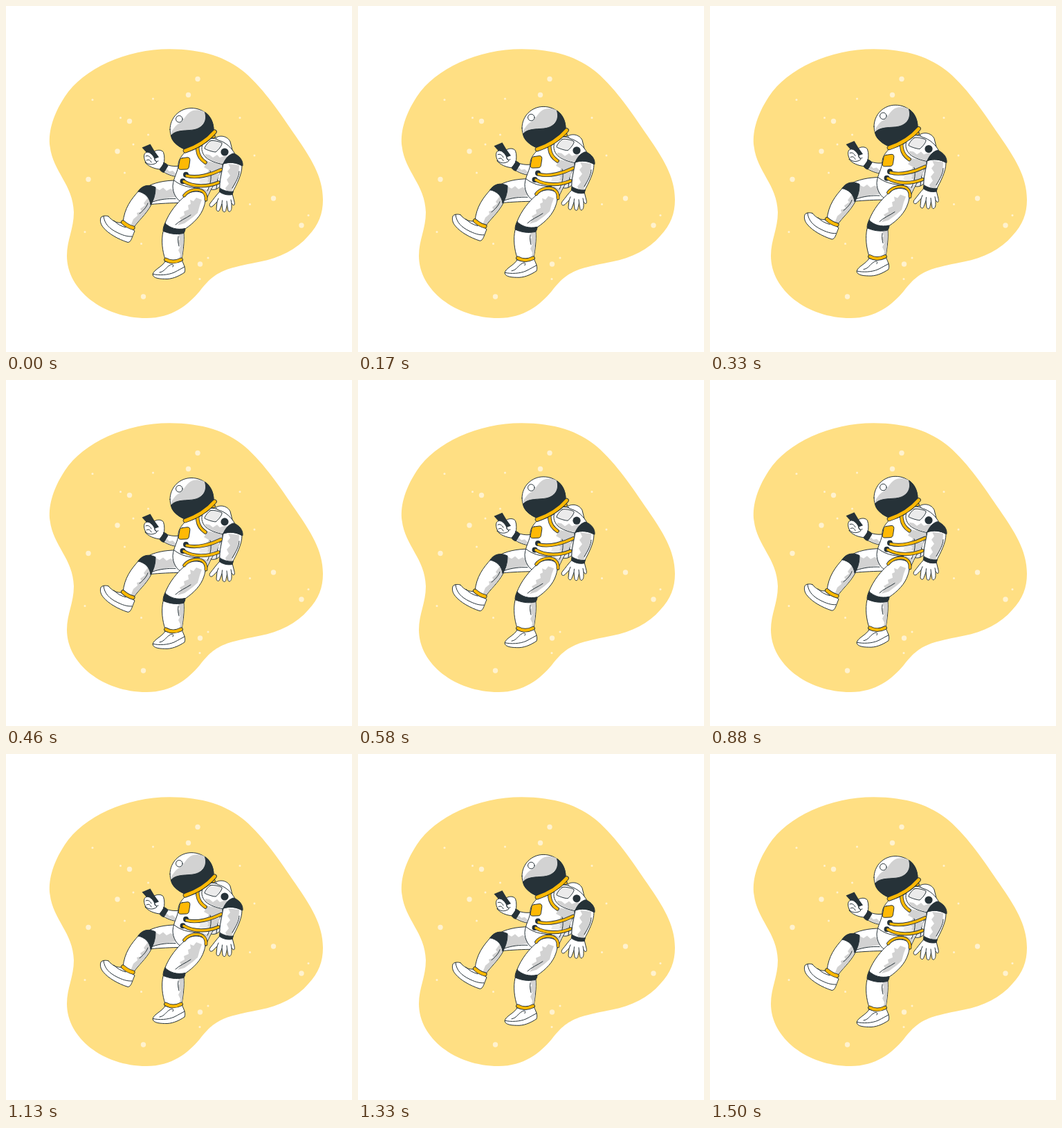
An HTML page for the animation above (1.54 s loop, 500x500 px).

```html
<!DOCTYPE html>
<html lang="en">
<head>
<meta charset="utf-8">
<title>Floating astronaut</title>
<style>
  html, body { margin: 0; width: 100%; height: 100%; overflow: hidden; background: #fff; }
  svg { display: block; width: 100vw; height: 100vh; }
  .line { fill: none; stroke: #263238; stroke-width: 1; stroke-linecap: round; stroke-linejoin: round; }
  .suit { fill: #fff; }
  .pale { fill: #ebebeb; }
  .shade { fill: #d2d2d2; }
  .dark { fill: #263238; }
  .gold { fill: #ffb905; }
  .blob { fill: #ffdf83; }
  .star { fill: #fff2cf; }
</style>
</head>
<body>
<svg id="stage" viewBox="0 0 500 500"></svg>
<script>
const INK = '#263238', GOLD = '#ffb905';

const fill = (name, d) => `<path class="${name}" d="${d}"/>`;
const line = d => fill('line', d);
const part = (name, d) => fill('line ' + name, d);
const dot = (name, x, y, r) => `<circle class="${name}" cx="${x}" cy="${y}" r="${r}"/>`;
const stroke = (d, w, color) =>
  `<path d="${d}" fill="none" stroke="${color}" stroke-width="${w}" stroke-linecap="round"/>`;
const band = (d, w) => stroke(d, w + 1.8, INK) + stroke(d, w, GOLD);

const bigStars = [[277, 105.5], [263.5, 128.5], [178.5, 166.5], [161, 210], [119, 250.5],
  [386.5, 278], [427, 317], [280.5, 373], [198.5, 420]];
const smallStars = [[125, 135.5], [212.5, 134], [165.5, 161.5], [338, 161.5], [205.5, 186],
  [184, 200], [171.5, 241], [114, 326.5], [359, 216], [352.5, 286.5], [437, 302.5],
  [195.5, 343.5], [292, 364], [280, 394.5]];

const sky = [
  fill('blob', `M237 62.3C175 62 112 90 85 131C66 160 61 185 63.5 203C68 240 97 258 98 298
    C98 322 88 338 88 361C88 410 140 451 203 451C240 451 263 432 280 412
    C294 394 303 387 320 380.5C338 375 350 373 367 369.5C395 364 420 352 437 332
    C452 316 458 300 458 280C458 246 440 219 418 187C398 158 374 121 345 96
    C319 74 283 62.3 237 62.3Z`),
  ...bigStars.map(([x, y]) => dot('star', x, y, 3.7)),
  ...smallStars.map(([x, y]) => dot('star', x, y, 1.5))
];

const backpack = [
  part('suit', 'M300 193C305 186 319 186 324 196L328 212L303 204Z'),
  part('pale', 'M296 228L314 224L309 261C304 266 298 267 291 263Z'),
  line('M307 240L304 264')
];

const phoneArm = [
  part('suit', 'M230 228.5C237 231.5 245 232.5 253 230.5L249 247C240 246 232 243 225 238Z'),
  fill('shade', 'M229 237.5L233 236L236 239L241 238L245 242L249 241L248 246C240 245 233 242 229 239Z'),
  part('suit', `M213 211C217 207.5 225 207 227.5 211.5C229.5 217 229 224 228 228L222 236
    C214 235 206 232 201 226L206 214Z`),
  fill('dark', 'M196.5 204.5L208.5 199.5L214.5 209.5L221 218.5L215.5 220.5L205 214Z'),
  part('suit', `M202 226C198.5 220 198.5 212.5 203 211.5C207 210.5 211 214 214 219
    C215 223 217 224 218 226C215 229 207 231 202 226Z`),
  line('M202 217C205 215.5 208 217 210 221M203 223C206 221.5 208 222 210 226'),
  line('M215 220.5C214 223 216 226 220 224'),
  part('dark', 'M228 226.5C231 227 233 229 234 231C232 234 230 238 228 240.5C225 240 223 238 222 236C225 233 227 230 228 226.5Z')
];

const bentLeg = [
  part('suit', 'M252 252C236 251.5 219 253.5 206 260L210 286.5C222 285.5 238 284.5 254 284.5Z'),
  fill('shade', `M216 263L222 266L227 262.5L232 267L238 264L243 267L252 264L252 276
    C238 276 226 279 213 283L215.5 274Z`),
  line('M212 283C222 279.5 234 278 245 278.5'),
  part('suit', 'M192 267C181 279 171 292 169 313C174 317 179 320 184 321C191 310 202 302 210 287C209 277 203 269 192 267Z'),
  fill('shade', `M205 277L199 285L201 288L194 293L196 297L189 299L190 303L184 308
    L180 318L184 320C191 309 202 301 209 287C209 282 208 279 205 277Z`),
  line('M193 300C198 296 203 291 205 285'),
  part('dark', 'M191 268C196 259 207 257 216 262C216 272 214 280 209 287.5C208 277 201 270 191 268Z'),
  part('suit', `M148 304C145 302.5 138.5 303 137 306C135.5 311 137 316 141 320.5C148 329 162 337 176 341.5
    C181 341.5 182 334 186 325L168 313C160 314 154 311 148 304Z`),
  line('M141 303.5C142 315 150 322 160 327C168 331 175 333.5 182 333'),
  line('M156 310C160 315 166 318 173 320'),
  band('M169 312.5C174 317 179 319.5 183.5 320.5', 4.4)
];

const torso = [
  part('suit', `M259 211C276 208 291 198 300 187L312 201L313 234C308 244 303 252 300 259
    C294 268 291 277 288 283C276 286 263 287 257 285C246 281 241 270 241 260
    C242 247 249 240 249 228C250 221 254 216 259 211Z`),
  fill('shade', `M283 223L288 230L286 233L293 237L291 241L302 240L312 235L312 228Z`),
  fill('pale', 'M274 247L281 251L279 255L287 258L303 255L309 242L292 246Z'),
  fill('shade', 'M289 246L293 250L291 253L297 257L303 254L309 242Z'),
  fill('shade', 'M270 262L277 265L283 263L290 266L297 261L291 273L283 267L272 265Z'),
  line('M243 252C251 259 264 263 280 263M295 238C297 245 297 255 291 267'),
  part('gold', `M254.5 219.8L262 218.8C265 218.6 266 220.5 265.8 223L264.5 232
    C264 235 262.5 236 260 236L252.5 236.3C249.7 236.3 248.8 234.5 249.3 232L251 223C251.5 221 252.5 220 254.5 219.8Z`)
];

const straightLeg = [
  part('suit', `M258 275C248 284 236 297 229 316C238 323 248 325 259 322C271 314 282 303 286 290
    C288 284 289 278 287 272C277 265 264 268 258 275Z`),
  fill('shade', `M266 280L271 282L275 277L283 280L280 288L277 299L269 306L258 314L248 317
    L253 309L251 306L258 302L257 297L264 294L263 288L267 286Z`),
  line('M245 316C251 310 260 307 267 302'),
  part('suit', 'M227 326C224 339 226 354 230 366C238 371 246 370 254 366C256 354 258 341 257 328Z'),
  fill('shade', 'M249 330L251 337L248 341L252 347L249 353L252 359L250 367L254 365C256 353 257 341 256 329Z'),
  line('M249 333C248 339 249 343 250 347'),
  part('dark', 'M230 314C237 321 247 324 259 321.5C259 324 258 327 256.5 328.5C246 331 235 329 227 325C227 321 228 317 230 314Z'),
  part('suit', `M230 369C226 377 213 381 212 388C213 394 223 394.5 233 394.5C243 394 252 389 258 385
    C260 379 257 374 254 367C246 372 237 372 230 369Z`),
  line('M212.5 387.5C221 389.5 234 389 243 385C249 382 254 379 258 377'),
  line('M222 385C229 384 231 378 236 375C240 372 243 373 241 377'),
  band('M231 366.5C238 370.5 246 370 253 366.5', 4),
  band('M257.5 274C264 265 279 263 285 268.5C288 271 289.5 275 289 280', 3)
];

const hoses = [
  dot('dark', 260, 243.8, 4),
  dot('dark', 255.5, 253.2, 4),
  band('M261 245.3C276 249.5 297 243.5 311 236.5', 3.4),
  band('M257 253.5C271 262 292 261.5 307 255', 3.4)
];

const restArm = [
  band('M300 188.5C284 186 275 198 277 209C278 217 282 222 288 226', 3.8),
  part('suit', 'M286 197C291 190 301 190 307 194C318 197 326 205 331 214C322 215 317 221 314 229C304 227 295 224 289 219C282 212 281 203 286 197Z'),
  fill('shade', 'M288 214L294 215L299 219L305 215L309 219L315 217L321 217C317 221 315 225 314 228C303 226 293 222 288 217Z'),
  part('pale', 'M295 195C297 193 310 196 312 198C313 201 306 209 303 211C299 211 290 208 287 206C287 203 292 197 295 195Z'),
  dot('dark', 316, 211, 5.6),
  part('suit', 'M314 228C312 241 308 253 309 266C315 270 321 271 327 270C333 258 341 244 341 231C333 226 323 225 314 228Z'),
  fill('shade', 'M321 228L324 234L320 239L324 245L319 251L322 257L317 263L319 268L326 268C331 257 337 246 337 230Z'),
  line('M327 263C332 255 337 246 337 239'),
  part('dark', 'M314 228C317 220 323 214 329 213C337 216 343 223 342 231C333 226 323 225 314 228Z'),
  part('suit', `M309 268C304 273 300 279 295 285C292.5 289 296 292 299 289L305 283L304 293
    C304 297 308 298 309 294L312 286L313 295C314 299 318 298 318 294L319.5 287L321 296
    C323 299 326 296 326 291L326 285C329 290 331 288 330 283L327 271Z`),
  line('M305 283L307 278M312 286L312.5 281M319.5 287L319 282M326 285L325 280'),
  part('dark', 'M309.5 263.5C315 267 322 269 328.5 268L327 272.5C320 274 313 272 308.5 268.5Z')
];

const helmet = [
  part('suit', 'M237 178.6C237 161 251 147.6 268 147.6C287 147.6 300 162 300 179C300 188 295 195 285 199L259 207C246 203 237 192 237 178.6Z'),
  fill('shade', 'M238 186C239 181 243 175 248 171C257 167 259 157 267 152.5C274 149 282 150 287.5 153.5C294 163 289 176 278 181C264 185 247 182 238 186Z'),
  part('dark', `M238.5 187C246 178 262 181 273 178.5C286 175 291 165 287.5 153.5C296 159 300 169 300 179.5
    C298 191 279 199 258 207C247 202 239 195 238.5 187Z`),
  '<circle class="line suit" cx="250.3" cy="163.3" r="4.8"/>',
  band('M259 209.3C276 203.5 291 194 301.5 181.8', 4.8)
];

const figure = [backpack, phoneArm, bentLeg, torso, straightLeg, hoses, restArm, helmet].flat();
document.getElementById('stage').innerHTML =
  sky.join('') + `<g id="astronaut">${figure.join('')}</g>`;

const astronaut = document.getElementById('astronaut');
const LOOP = 1540, STEP = 1000 / 24, STEPS = 36, LIFT = 10;

// Linear rise and fall, stepped at 24 pictures a second, with one step of rest.
function draw(ms) {
  const step = Math.min(STEPS, Math.floor((ms % LOOP + 5) / STEP));
  const lift = LIFT * (1 - Math.abs(1 - 2 * step / STEPS));
  astronaut.setAttribute('transform', `translate(0 ${-lift.toFixed(3)})`);
}

let start;
function tick(now) {
  start ??= now;
  draw(now - start);
  requestAnimationFrame(tick);
}
draw(0);
requestAnimationFrame(tick);
</script>
</body>
</html>
```
